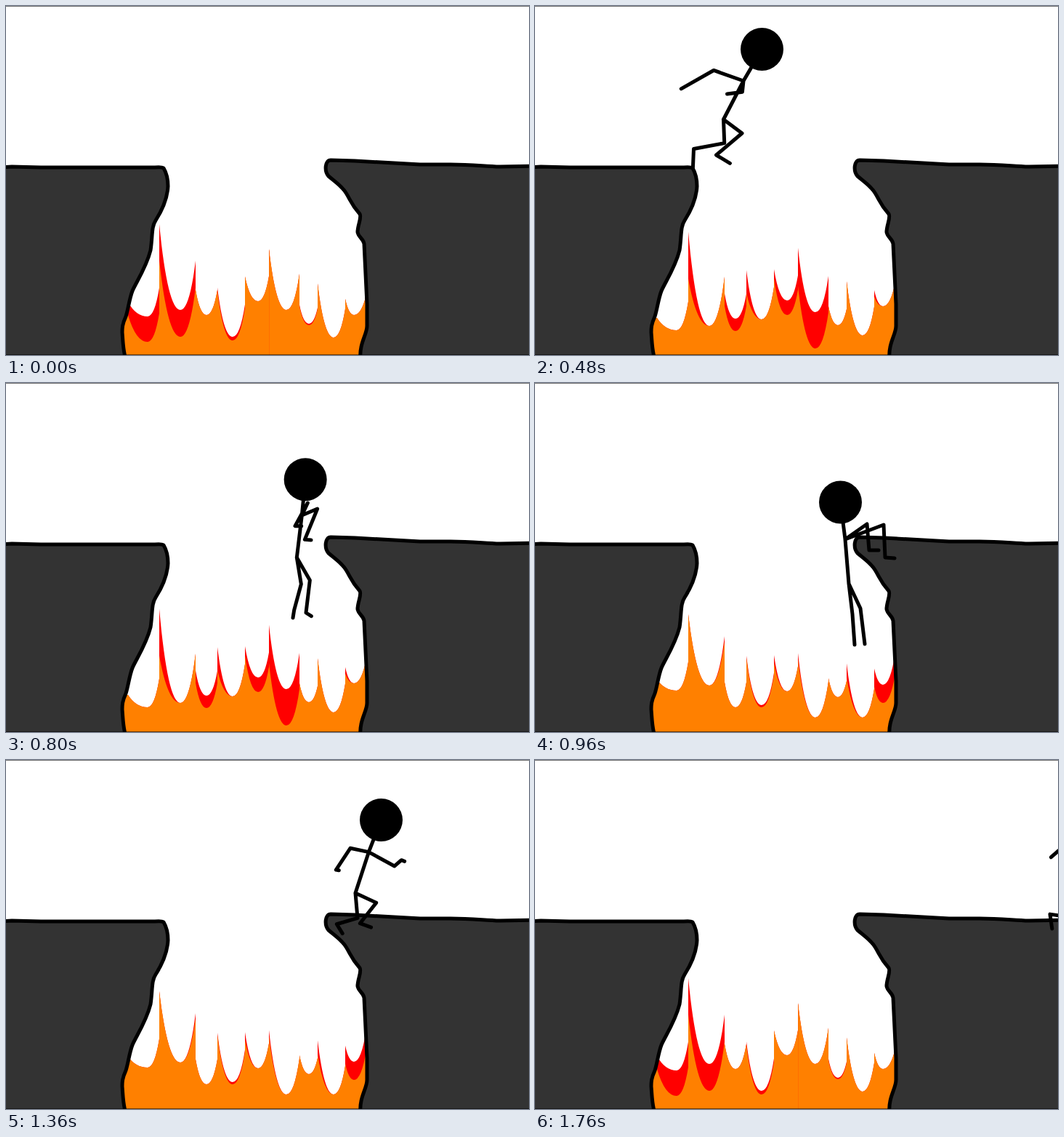
These frames come from a looping animation (720 px wide and 480 px high, 1840 ms). An HTML page:

```html
<!DOCTYPE html>
<html lang="en">
<head>
<meta charset="utf-8">
<title>Leap over the fire</title>
<style>
  html, body { margin: 0; width: 100%; height: 100%; overflow: hidden; background: #fff; }
  svg { display: block; width: 100%; height: 100%; }
  .ink { fill: none; stroke: #000; stroke-width: 5; stroke-linecap: round; stroke-linejoin: round; }
  .rock { fill: #333; }
</style>
</head>
<body>
<svg viewBox="0 0 720 480">
  <path id="red" fill="#f00"/>
  <path id="orange" fill="#ff8000"/>
  <path id="seam" d="M362.5 336V480" stroke="#f50" opacity=".4"/>
  <path class="ink rock" d="M-6 222L8 221L48 222H205Q214 221 217 223Q223 233 223 248C222 268 213 284 206 295C200 304 202 316 199 336C193 360 178 382 174 392C170 402 168 418 165 427C160 438 160 443 160 449C161 460 161 474 165 486H-6Z"/>
  <path class="ink rock" d="M726 220L680 221C655 220 640 218 612 218H570L480 213L447 212C439 212 438 227 444 234C452 241 462 247 468 257C475 268 475 273 487 286C490 291 484 301 484 311C485 318 492 320 493 327L497 410V440C497 452 486 464 488 486H726Z"/>
  <g id="figure">
    <path id="body" class="ink"/>
    <circle id="head" r="29.5"/>
  </g>
  <path d="M0 .5H720M0 479.5H720" stroke="#000" stroke-opacity=".55"/>
</svg>
<script>
const STEP = 80, FRAMES = 23, FLAME_HOLD = 6;
const el = id => document.getElementById(id);
const nums = s => s.match(/[\d.]+/g).map(Number);
const mix = (a, b, k) => a + (b - a) * k;

// Tips and valleys alternate along the pit; only their heights change.
const flameX = nums('168 195 211 240 261 276 291 312 329 347 362 386 404 417 429 451 467 479 496');

// Each valley is a parabola, cut off by straight walls below the tips.
function ridge(ys) {
  let d = `M150 480V${ys[0]}H${flameX[0]}`;
  for (let i = 1; i < ys.length; i += 2) {
    const vx = flameX[i], vy = ys[i];
    const side = j => {
      const dx = flameX[j] - vx;
      return [vx + 0.6 * dx, flameX[j], Math.max(ys[j], vy - dx * dx / 6.5)];
    };
    const [ac, , ay] = side(i - 1), [bc, bx, by] = side(i + 1);
    d += `V${ay}Q${ac} ${vy} ${vx} ${vy}Q${bc} ${vy} ${bx} ${by}V${ys[i + 1]}`;
  }
  return d + 'H505V480Z';
}

// Orange copies the red ridge, sunk at a few points so that red shows through.
function flame(heights, sunk) {
  const ys = nums(heights);
  return { red: ridge(ys), orange: ridge(ys.map((y, i) => y + (sunk[i] || 0))) };
}

const flames = [
  flame('407 427 300 418 330 425 363 455 372 406 334 418 335 437 378 456 378 425 397',
    { 0: 18, 1: 35, 2: 50, 3: 37, 6: 10, 7: 5, 13: 2 }),
  flame('429 446 307 440 307 430 359 431 362 405 315 421 315 439 332 453 371 413 380',
    { 2: 68, 4: 58, 5: 17, 6: 36, 9: 20, 10: 70, 11: 50, 12: 75, 16: 29 }),
  flame('408 423 318 416 342 446 371 443 337 424 347 460 382 432 290 460 389 415 368',
    { 4: 14, 7: 3, 8: 48, 10: 33, 14: 115, 16: 25, 17: 25, 18: 32 })
];

// Core is shoulder, head, hip; limbs are two arms, then two legs.
function pose(core, ...limbs) {
  const points = s => {
    const a = nums(s);
    return a.filter((_, i) => i % 2 === 0).map((x, i) => [x, a[2 * i + 1]]);
  };
  const [o, head, hip] = points(core);
  const rel = ([x, y]) => [x - o[0], y - o[1]];
  const pad = p => [0, 1, 2].map(i => rel(p[Math.min(i, p.length - 1)]));
  return { head: rel(head), hip: rel(hip), limbs: limbs.map(s => pad(points(s))) };
}

const run = pose('187,126 210.5,85 163,180',
  '138,137 129,178', '208,163 238,146',
  '152,218 104,204 104,224', '194,175 170,218 188,217');
const fly = pose('368,116 395.5,70 337,168',
  '332,107 274,130', '326,129 270,166',
  '345,194 310,217 305,249', '359,194 331,230 353,244');
const hang = pose('427,215 420.5,164 432,276',
  '457,194 460,230 473,230', '480,195 482,240 495,241',
  '437,318 440,360', '448,310 454,359');
const sit = pose('432,128 436.5,77.5 425,189',
  '448,152 452,186 464,188', '461,151 461,189 474,194',
  '445,214 458,253 476,252', '453,205 472,242 486,241');

const anchor = (p, i) => i < 2 ? [0, 0] : p.hip;

// Running swings every limb about its shoulder or hip.
const SWING = [40, -40, -9, 35];
function stride(n) {
  const phase = Math.sin(Math.PI * (n - 4) / 5) ** 2;
  const limbs = run.limbs.map((limb, i) => {
    const a = SWING[i] * phase * Math.PI / 180, [cx, cy] = anchor(run, i);
    return limb.map(([x, y]) => [
      cx + (x - cx) * Math.cos(a) - (y - cy) * Math.sin(a),
      cy + (x - cx) * Math.sin(a) + (y - cy) * Math.cos(a)
    ]);
  });
  return { ...run, limbs };
}

// Step, shoulder position, pose.
const track = [
  [1, -8, 126, run], [5, 252, 126, run],
  [7, 322, 80, fly], [8, 368, 116, fly],
  [11, 427, 215, hang], [12, 427, 215, hang],
  [15, 432, 128, sit],
  [18, 533, 126, run], [22, 788, 126, run]
];

function drawFigure(n) {
  const shown = n >= track[0][0];
  el('figure').style.display = shown ? '' : 'none';
  if (!shown) return;
  const i = Math.max(1, track.findIndex(key => key[0] >= n));
  const [n0, x0, y0, p0] = track[i - 1], [n1, x1, y1, p1] = track[i];
  const k = (n - n0) / (n1 - n0);
  const [a, b] = [p0, p1].map(p => p === run ? stride(n) : p);
  const at = (p, q) => [mix(x0 + p[0], x1 + q[0], k), mix(y0 + p[1], y1 + q[1], k)];
  const line = pts => 'M' + pts.join('L');
  const head = at(a.head, b.head);
  const limbs = a.limbs.map((limb, j) => line([
    at(anchor(a, j), anchor(b, j)),
    ...limb.map((p, m) => at(p, b.limbs[j][m]))
  ]));
  el('head').setAttribute('cx', head[0]);
  el('head').setAttribute('cy', head[1]);
  el('body').setAttribute('d', line([head, at([0, 0], [0, 0]), at(a.hip, b.hip)]) + limbs.join(''));
}

function draw(ms) {
  const n = Math.floor(ms / STEP) % FRAMES;
  const f = Math.floor(n / FLAME_HOLD) % flames.length;
  el('red').setAttribute('d', flames[f].red);
  el('orange').setAttribute('d', flames[f].orange);
  el('seam').style.display = f ? 'none' : '';
  drawFigure(n);
}

const start = performance.now();
function tick() {
  draw(performance.now() - start);
  requestAnimationFrame(tick);
}
tick();
</script>
</body>
</html>
```
